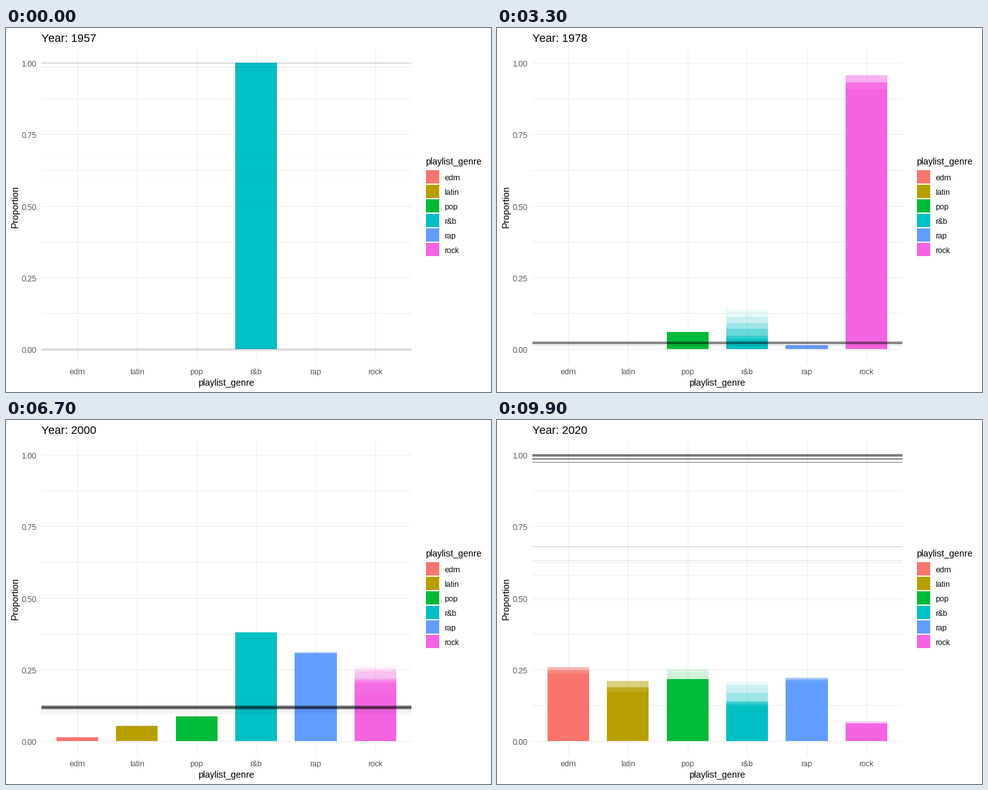
Recreate the animation shown at these times as a matplotlib script. Size 768 by 576 pixels, loop 10 s.

```python
import random

import matplotlib.pyplot as plt
import numpy as np
from matplotlib.animation import FuncAnimation
from matplotlib.collections import PolyCollection
from matplotlib.colors import to_rgb

W, H, DPI = 768, 576, 96
FRAMES, INTERVAL = 100, 100
FIRST, LAST = 1957, 2020
WAKE = 10
LEFT, RIGHT, TOP, BOTTOM = 56, 642, 33, 530
ZERO, SPAN = 508, 453
LINE_WIDTH, LINE_ALPHA = 4.27, 0.11
GENRES = ["edm", "latin", "pop", "r&b", "rap", "rock"]
COLORS = ["#F8766D", "#B79F00", "#00BA38", "#00BFC4", "#619CFF", "#F564E3"]
GRID, GREY = "#EBEBEB", "#4D4D4D"
EDM, LATIN, POP, RNB, RAP, ROCK = range(6)

# Turning points of each genre in percent; rock takes what is left.
TRACKS = [
    (EDM, {1999: 1, 2006: 2.5, 2018: 23, 2019: 25.7, 2020: 23.4}),
    (LATIN, {1965: 10}),
    (LATIN, {1979: 2, 1987: 1.5, 1988: 9.5, 1993: 5.5, 1994: 1.6, 2002: 7,
             2004: 19.2, 2005: 13, 2006: 22, 2018: 17, 2019: 20.8,
             2020: 16.7}),
    (POP, {1978: 5.8, 1986: 8, 1987: 12.5, 1988: 5, 1990: 11.3, 1994: 4.4,
           2002: 10, 2006: 7.2, 2017: 25, 2018: 18, 2020: 21.6}),
    (RNB, {1957: 100, 1962: 100}),
    (RNB, {1965: 20, 1974: 13.5, 1977: 4.4, 1978: 2.2, 1985: 10, 1986: 26.8,
           1987: 19.5, 1988: 33.5, 1991: 34.8, 1992: 52.2, 1994: 34,
           2002: 41, 2004: 25.7, 2006: 18.8, 2017: 19.5, 2018: 13.8,
           2020: 12}),
    (RAP, {1978: 1.2, 1987: 2.5, 1988: 18.8, 1991: 7.6, 1994: 34, 2003: 29,
           2005: 20, 2006: 29, 2018: 21.5, 2020: 20.2}),
]
ROCK_START, ROCK_MIN = 1963, 0.05

# Running total of all songs, growing exponentially between these years.
TOTAL = {1957: .0004, 1965: .0018, 1978: .0245, 1994: .085, 2005: .1755,
         2016: .4964, 2018: .681, 2019: .9746, 2020: 1}


def key_frame(year):
    return round((year - FIRST) * (FRAMES - 1) / (LAST - FIRST))


def running_total(year):
    return np.exp(np.interp(year, list(TOTAL), np.log(list(TOTAL.values()))))


def yearly_shares():
    rng = random.Random(7)
    shares = {y: {} for y in range(FIRST, LAST + 1) if y != 1959}
    for genre, points in TRACKS:
        years = list(points)
        for y in shares:
            if years[0] <= y <= years[-1]:
                value = np.interp(y, years, list(points.values())) / 100
                if y not in points and value < 1:
                    value *= rng.uniform(0.92, 1.08)
                shares[y][genre] = value
    for y, parts in shares.items():
        if y >= ROCK_START:
            parts[ROCK] = max(ROCK_MIN, 1 - sum(parts.values()))
    return shares


def tween_states():
    """Bar heights by genre and line height for every step of the loop."""
    shares = yearly_shares()
    years = list(shares)
    states = [None] * FRAMES
    for y0, y1 in zip(years, years[1:]):
        k0, k1 = key_frame(y0), key_frame(y1)
        a, b = shares[y0], shares[y1]
        lo, hi = running_total(y0), running_total(y1)
        for k in range(k0, k1 + 1):
            t = (k - k0) / (k1 - k0)
            if t in (0, 1):
                bars = b if t else a
            else:
                bars = {g: a[g] + (b[g] - a[g]) * t for g in a if g in b}
            states[k] = bars, lo + (hi - lo) * t
    return states


def box(x0, y0, x1, y1):
    return [(x0, y0), (x1, y0), (x1, y1), (x0, y1)]


def center(i):
    return 112.75 + 94.45 * i


def bar_box(genre, height):
    mid = center(genre)
    top = int(ZERO - 0.2 - (SPAN - 0.8) * height)
    return box(round(mid - 33.1), top, round(mid + 33.1), ZERO)


def line_box(value, scale):
    width = max(1, round(LINE_WIDTH * scale))
    y = round(ZERO + 0.9 - SPAN * value - width / 2)
    return box(LEFT, y, RIGHT, y + width)


STATES = tween_states()

plt.rcParams.update({"font.family": "Liberation Sans",
                     "text.hinting": "native", "text.hinting_factor": 1})
fig = plt.figure(figsize=(W / DPI, H / DPI), dpi=DPI, facecolor="white")
ax = fig.add_axes([0, 0, 1, 1])
ax.set_xlim(0, W)
ax.set_ylim(H, 0)
ax.axis("off")


def add_boxes(boxes, colors, z):
    coll = PolyCollection(boxes, facecolors=colors, edgecolors="none",
                          linewidths=0, antialiased=False, zorder=z)
    ax.add_collection(coll, autolim=False)
    return coll


def label(x, y, text, px, color="black", ha="left", va="baseline", **kw):
    return ax.text(x, y, text, fontsize=px * 72 / DPI, color=color,
                   ha=ha, va=va, **kw)


grid = [box(LEFT, y, RIGHT, y + 1)
        for y in (round(ZERO - SPAN * i / 8) for i in range(9))]
grid += [box(round(center(i)), TOP, round(center(i)) + 1, BOTTOM)
         for i in range(6)]
add_boxes(grid, GRID, 1)
add_boxes([box(665, 225 + 23 * i, 686, 246 + 23 * i) for i in range(6)],
          COLORS, 1)

for i in range(5):
    label(49, round(ZERO - SPAN * i / 4) + 6, f"{i / 4:.2f}", 12, GREY, "right")
for i, name in enumerate(GENRES):
    label(center(i), 548, name, 12, GREY, "center")
    label(694, 241 + 23 * i, name, 12)
label(348.5, 566, "playlist_genre", 15, ha="center")
label(664, 216, "playlist_genre", 15)
label(15, 282.5, "Proportion", 15, ha="center", va="center", rotation=90)

title = label(56, 22, "", 18)
bars = add_boxes([], "none", 2)
lines = add_boxes([], "none", 3)


def draw(k):
    now = STATES[k][0]
    bar_boxes, bar_colors, line_boxes, line_colors = [], [], [], []
    for lag in range(WAKE - 1, -1, -1):
        fade = (1 - lag / WAKE) ** 3
        heights, total = STATES[(k - lag) % FRAMES]
        shown = [g for g in heights if g in now]
        for g in shown:
            bar_boxes.append(bar_box(g, heights[g]))
            bar_colors.append((*to_rgb(COLORS[g]), fade))
        if shown:
            # One translucent line per genre, stacked.
            alpha = 1 - (1 - LINE_ALPHA * fade) ** len(shown)
            line_boxes.append(line_box(total, fade))
            line_colors.append((0, 0, 0, alpha))
    bars.set_verts(bar_boxes)
    bars.set_facecolor(bar_colors)
    lines.set_verts(line_boxes)
    lines.set_facecolor(line_colors)
    year = round(FIRST + k * (LAST - FIRST) / (FRAMES - 1))
    title.set_text(f"Year: {year}")
    return bars, lines, title


anim = FuncAnimation(fig, draw, frames=FRAMES, interval=INTERVAL,
                     repeat=True, repeat_delay=0)
plt.show()
```
